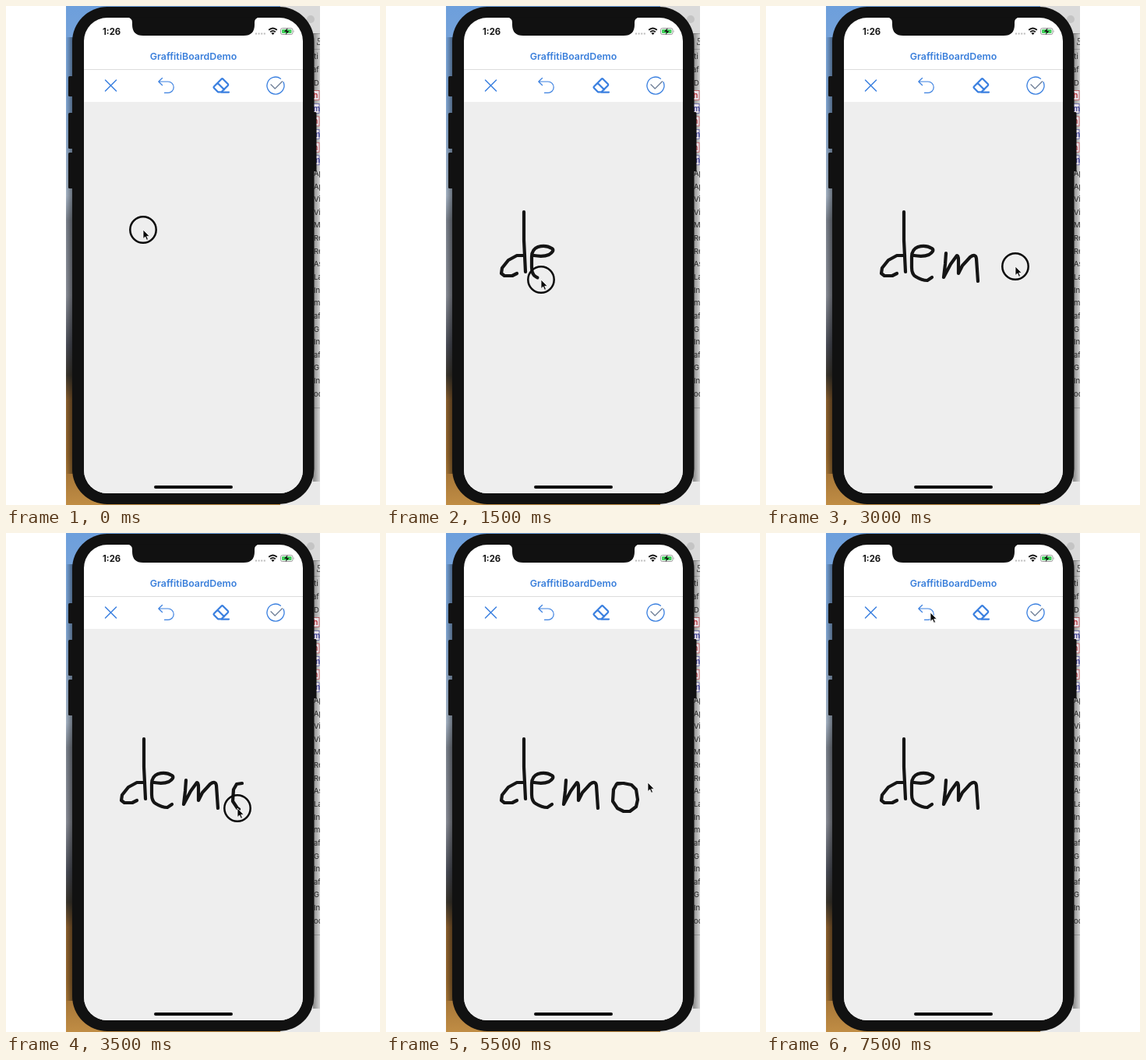
These frames come from a looping animation (480x640 px, 8000 ms). An HTML page:

```html
<!DOCTYPE html>
<html lang="en">
<head>
<meta charset="utf-8">
<title>Graffiti board</title>
<style>
  html, body { margin: 0; width: 100%; height: 100%; overflow: hidden; background: #fff; }
  svg { display: block; width: 100%; height: 100%; }
  text { font-family: Inter, Roboto, sans-serif; }
  .icon { fill: none; stroke: #3b80e0; stroke-width: 1.5; stroke-linecap: round; stroke-linejoin: round; }
  #ink path { fill: none; stroke: #151515; stroke-width: 4.2; stroke-linecap: round; stroke-linejoin: round; }
</style>
</head>
<body>
<svg viewBox="0 0 480 640">
  <defs>
    <linearGradient id="desk" x2="0" y2="1">
      <stop offset="0" stop-color="#6d9fdc"/>
      <stop offset=".2" stop-color="#83a8d4"/>
      <stop offset=".38" stop-color="#a7b5c6"/>
      <stop offset=".43" stop-color="#7d848f"/>
      <stop offset=".58" stop-color="#8b8f99"/>
      <stop offset=".68" stop-color="#4b4e58"/>
      <stop offset=".74" stop-color="#3d382f"/>
      <stop offset=".79" stop-color="#8a5f2e"/>
      <stop offset=".9" stop-color="#98692f"/>
      <stop offset="1" stop-color="#c08d45"/>
    </linearGradient>
    <linearGradient id="shadeL"><stop stop-color="#000" stop-opacity="0"/><stop offset="1" stop-opacity=".5"/></linearGradient>
    <linearGradient id="shadeR"><stop stop-opacity=".42"/><stop offset="1" stop-opacity=".08"/></linearGradient>
    <clipPath id="shot"><path d="M77 0H403V640H77Z"/></clipPath>
  </defs>

  <g clip-path="url(#shot)">
    <path fill="url(#desk)" d="M77 0H386V640H77Z"/>
    <path fill="url(#shadeL)" d="M77 40H87V600H77Z"/>
    <path fill="#e9e9e9" d="M352 0H403V640H352Z"/>
    <path fill="#dadada" d="M352 0H403V35H352Z"/>
    <path stroke="#bbb" d="M385 35.5H403M385 55.5H403M385 515.5H403"/>
    <path fill="url(#shadeR)" d="M394 35H403V610H394Z"/>
    <circle cx="391" cy="17" r="5" fill="#c4c4c4"/>
    <path fill="none" stroke="#555" d="M400 41.5H405M400.5 41V45H405M399 49.5H405M399.500 47V50"/>
    <g id="side" font-size="9.500" fill="#222"></g>

    <g fill="#111">
      <rect x="80" y="90" width="8" height="26" rx="1.500"/>
      <rect x="80" y="137" width="8" height="46" rx="1.500"/>
      <rect x="80" y="188" width="8" height="46" rx="1.500"/>
      <rect x="392" y="136" width="6.500" height="76" rx="1.500"/>
      <rect x="85" y="1" width="310.500" height="638" rx="45"/>
    </g>
  </g>

  <rect x="100" y="15" width="281" height="610" rx="30" fill="#fff"/>
  <path fill="#eee" d="M100 123H381V595A30 30 0 0 1 351 625H130A30 30 0 0 1 100 595Z"/>
  <path stroke="#dcdcdc" d="M100 81.500H381"/>
  <path fill="#111" d="M155 14.500Q162 15 162 21V24Q162 38 176 38H305Q319 38 319 24V21Q319 15 326 14.500Z"/>
  <rect x="190" y="615" width="101" height="4" rx="2" fill="#080808"/>

  <text x="124" y="36.500" font-size="11.300" font-weight="700" fill="#151515">1:26</text>
  <text x="240.500" y="69.300" font-size="12.400" font-weight="600" fill="#3a7fdb" text-anchor="middle">GraffitiBoardDemo</text>

  <!-- status bar -->
  <path stroke="#bbb" stroke-width="2" stroke-dasharray="2 1.600" d="M320 35.500H333"/>
  <g fill="none" stroke="#111" stroke-width="1.800">
    <path d="M337.200 30.800Q342.500 26.300 347.800 30.800M339.200 33.300Q342.500 30.500 345.800 33.300"/>
    <path fill="#111" stroke="none" d="M340.400 34.800Q342.500 33.400 344.600 34.800L342.500 37Z"/>
  </g>
  <rect x="352.500" y="28.500" width="15.500" height="8" rx="2.200" fill="#fff" stroke="#999"/>
  <rect x="354" y="30" width="12.500" height="5" rx="1" fill="#43d15d"/>
  <path fill="#999" d="M369 31Q370.500 32.500 369 34Z"/>
  <path fill="#111" d="M361.500 28L357 33H360L358.800 37L363.500 32H360.500Z"/>

  <!-- toolbar -->
  <g class="icon">
    <path d="M127.500 95L141.500 109M141.500 95L127.500 109"/>
    <path stroke-width="1.200" d="M200.500 92.500L195.800 97L200.500 101.500M196 97H208A7.200 7.200 0 0 1 208 111.400H203.500"/>
    <path stroke-width="2.300" d="M267 103.200L276.500 93.700Q277.500 92.800 278.500 93.700L284.800 100Q285.600 101 284.800 102L276.500 110.300H272L267 105.200Q266 104.200 267 103.200ZM271.500 98.800L280 107.200M276 110.600H286"/>
    <path stroke-width="1.300" d="M356 97.500A11 11 0 1 1 352.500 93.200"/>
    <path stroke="#6f7f98" stroke-width="1.300" d="M340 100.800L345.200 106L354.500 96.800"/>
  </g>

  <g id="ink">
    <path d="M177 264L177 300L179 341"/>
    <path d="M178 320L168 320L157 326L149 336L148 343L152 346L162 346L168 343"/>
    <path d="M190 320Q202 322 209 319Q217 314 213 311Q205 306 195 309Q187 312 187 322L187 335Q187 344 192 347Q200 352 207 352L213 348"/>
    <path d="M231 317L230 331L228 348L237 331L245 320Q247 320 247 326L247 343L252 333L262 322Q269 317 270 324L272 353"/>
    <path d="M303 321L296 322L292 329L291 344L297 353L305 357L313 357L321 351L323 342L321 329L315 323L305 321L297 321"/>
  </g>

  <g id="pointer">
    <circle r="16.700" fill="none" stroke="#0c0c0c" stroke-width="2.500"/>
    <path fill="#080808" stroke="#fff" stroke-width=".8" d="M0 0V11.500L2.700 9L4.500 13.200L6.500 12.400L4.700 8.300H8.200Z"/>
  </g>
</svg>

<script>
const STEP = 500;
// pointer x, pointer y, pressed, strokes drawn
const poses = [
  [176, 287, 1, 0],
  [169, 319, 1, 1],
  [168, 343, 1, 2],
  [199, 351, 1, 2.82],
  [238, 322, 1, 3.1],
  [272, 352, 1, 4],
  [320, 334, 1, 4],
  [297, 353, 1, 4.37],
  [305, 321, 1, 5],
  [343, 324, 0, 5],
  [343, 324, 0, 5],
  [336, 320, 0, 5],
  [318, 311, 0, 5],
  [299, 303, 0, 5],
  [211, 102, 0, 5],
  [211, 102, 0, 4]
];
const byId = id => document.getElementById(id);
const pointer = byId('pointer');
const ring = pointer.querySelector('circle');
const strokes = [...document.querySelectorAll('#ink path')];
strokes.forEach(s => s.setAttribute('pathLength', 1));

// file list peeking out behind the phone
const labels = 'iti af D h m h m h m Ap Ap Vi Vi M Re Re As La In m af G In af G In od'.split(' ');
byId('side').innerHTML = labels.map((label, i) => {
  const y = 68.3 + i * 16.63;
  const badge = i > 2 && i < 9;
  const color = label === 'h' ? '#b3262e' : '#33358f';
  const box = `<rect x="392" y="${y - 9.5}" width="10" height="12" fill="#e9e3e8" stroke="${color}" stroke-width=".6"/>`;
  return badge
    ? `${box}<text x="394.500" y="${y}" fill="${color}" font-weight="600">${label}</text>`
    : `<text x="${i < 2 ? 393 : 395}" y="${y}">${label}</text>`;
}).join('');

function draw(now) {
  const [x, y, pressed, drawn] = poses[Math.floor(now / STEP) % poses.length];
  pointer.setAttribute('transform', `translate(${x} ${y})`);
  ring.style.display = pressed ? '' : 'none';
  strokes.forEach((s, i) => {
    const part = Math.min(1, drawn - i);
    s.style.display = part > 0 ? '' : 'none';
    s.setAttribute('stroke-dasharray', part < 1 ? `${part} 2` : 'none');
  });
  requestAnimationFrame(draw);
}
draw(0);
</script>
</body>
</html>
```
